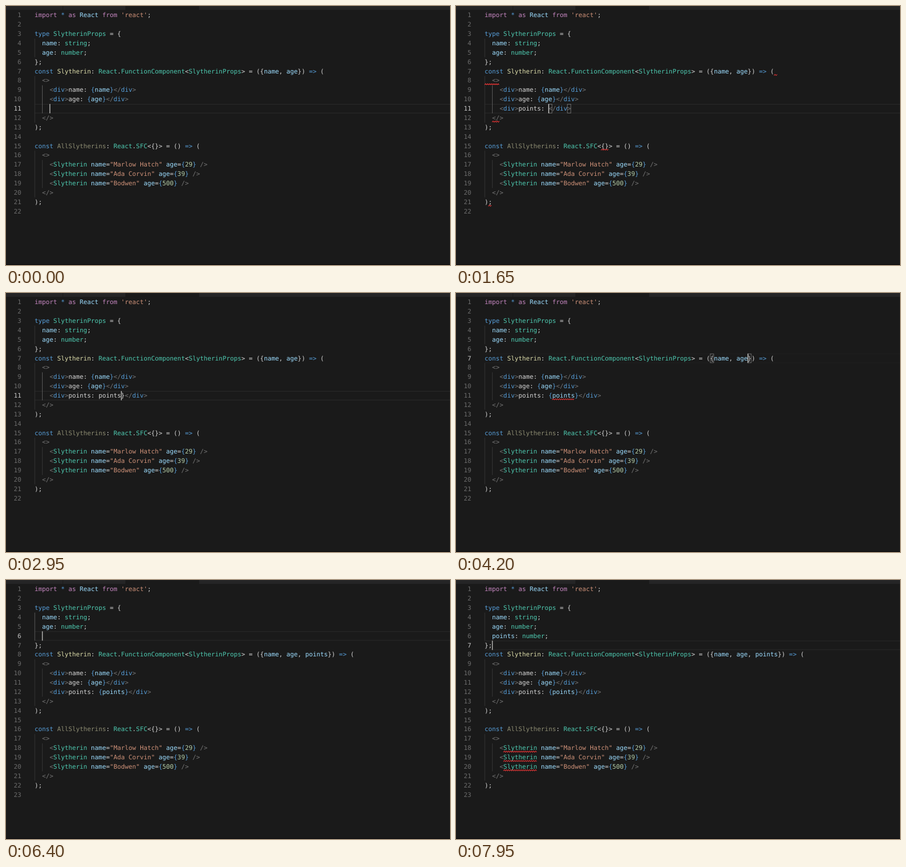
Animation of 800 by 468 pixels, one loop 8 s. Source, as an HTML page:

```html
<!DOCTYPE html>
<html lang="en">
<head>
<meta charset="utf-8">
<title>Code editor</title>
<style>
  html, body { margin: 0; width: 100%; height: 100%; overflow: hidden; background: #1a1a1a; }
  svg { display: block; width: 800px; height: 468px; }
  text { font: 11.25px "DejaVu Sans Mono", "Liberation Mono", monospace; text-rendering: geometricPrecision; white-space: pre; }
  .num { text-anchor: end; fill: #6c6c6c; }
  .num.on { fill: #c6c6c6; }
  .wave { fill: none; stroke: #dc3434; stroke-width: 1.1; }
  .match { fill: none; stroke: #808080; stroke-width: .8; }
</style>
</head>
<body>
<svg id="stage" viewBox="0 0 800 468"></svg>
<script>
const LOOP = 8000, LEFT = 51.5, TOP = 8.3, CHAR = 6.773, ROW = 16.875;
const COLORS = {
  w: '#d4d4d4', b: '#569cd6', p: '#c586c0', c: '#9cdcfe', t: '#4ec9b0',
  y: '#dcdcaa', d: '#8d8c72', s: '#ce9178', n: '#b5cea8', g: '#757575'
};
const stage = document.getElementById('stage');

const colX = col => LEFT + col * CHAR;
const rowY = line => TOP + (line - 1) * ROW;
const baseY = line => Math.round(rowY(line) + 12);
const escapeText = s => s.replace(/&/g, '&amp;').replace(/</g, '&lt;').replace(/>/g, '&gt;');
const within = (t, from, to) => t >= from && t < to;

// Number of keys pressed by time t
const keys = (t, start, gap, max) =>
  Math.max(0, Math.min(max, Math.floor((t - start) / gap) + 1));

// Keep the first n visible characters of "~<colour><text>" markup
function cut(markup, n) {
  return markup.split('~').slice(1).map(part => {
    const text = part.slice(1, 1 + Math.max(0, n));
    n -= part.length - 1;
    return text && '~' + part[0] + text;
  }).join('');
}

const rect = (x, y, w, h, fill) =>
  `<rect x="${x}" y="${y}" width="${w}" height="${h}" fill="${fill}"/>`;
const label = (x, y, fill, s, extra = '') =>
  `<text x="${x.toFixed(2)}" y="${y}" fill="${fill}" ${extra}>${escapeText(s)}</text>`;

function codeLine(markup, line) {
  let col = 0, out = '';
  for (const part of markup.split('~').slice(1)) {
    const text = part.slice(1), body = text.trim();
    if (body) out += label(colX(col + text.indexOf(body)), baseY(line), COLORS[part[0]], body);
    col += text.length;
  }
  return out;
}

function wave([line, col, len]) {
  const step = 1.875, y = rowY(line) + 15, x = colX(col);
  let d = `M${x} ${y + 1}`;
  for (let i = 1; i * step <= len * CHAR; i++) d += `L${x + i * step} ${y + (i % 2 ? -1 : 1)}`;
  return `<path class="wave" d="${d}"/>`;
}

const matchBox = (line, col) =>
  `<rect class="match" x="${colX(col) + .2}" y="${rowY(line) + .5}" width="${CHAR - .6}" height="${ROW - 1}"/>`;

const guide = (col, from, to, on) =>
  rect(colX(col), rowY(from), .8, (to - from + 1) * ROW, on ? '#6a6a6a' : '#3b3b3b');

const person = (name, age) =>
  `~g    <~tSlytherin ~cname~w=~s"${name}" ~cage~w=~b{~n${age}~b} ~g/>`;
const field = name => `~g    <~bdiv~g>~w${name}: ~b{~c${name}~b}~g</~bdiv~g>`;

function readState(t) {
  const s = {
    open: keys(t, 50, 110, 5),
    closed: t >= 700,
    text: keys(t, 900, 100, 8),
    value: keys(t, 2240, 70, 6),
    brace: within(t, 2150, 2800) || t >= 3450,
    param: keys(t, 4450, 220, 4) + keys(t, 5400, 80, 4),
    shift: t >= 6200 ? 1 : 0,
    prop: keys(t, 6600, 85, 9) + keys(t, 7450, 55, 6)
  };
  if (t < 700) s.cursor = [11, 4 + s.open];
  else if (t < 2150) s.cursor = [11, 9 + s.text];
  else if (t < 2800) s.cursor = [11, 18 + s.value];
  else if (t < 3250) s.cursor = [11, 23];
  else if (t < 3800) s.cursor = [11, s.brace ? 18 : 17];
  else if (t < 5900) s.cursor = [7, 70 + s.param];
  else if (t < 6200) s.cursor = [5, 14];
  else if (t < 7900) s.cursor = [6, 2 + s.prop];
  else s.cursor = [7, 2];
  return s;
}

function pointsLine(t, s) {
  let out = '~w    ' + cut('~g<~bdiv~g>', s.open) + cut('~wpoints: ', s.text);
  const name = 'points'.slice(0, s.value);
  if (s.brace) out += `~b{~c${name}~b}`;
  else if (t >= 2800) out += `~w${name}}`;
  return out + (s.closed ? '~g</~bdiv~g>' : '');
}

function source(t, s) {
  const unclosed = within(t, 490, 700);
  const lines = [
    "~pimport ~b* ~pas ~cReact ~pfrom ~s'react'~w;",
    '',
    '~btype ~tSlytherinProps~w = {',
    '~c  name~w: ~tstring~w;',
    '~c  age~w: ~tnumber~w;',
    '~w};',
    '~bconst ~ySlytherin~w: ~tReact~w.~tFunctionComponent~w<~tSlytherinProps~w> = ({~cname~w, ~cage' +
      cut('~w, ~cpoints', s.param) + '~w}) ~b=>~w (',
    '~g  <>',
    field('name'),
    field('age'),
    pointsLine(t, s),
    '~g  </>',
    '~w);',
    '',
    unclosed ? '~wconst AllSlytherins: React.SFC<~b{}~w> = () => ('
      : '~bconst ~dAllSlytherins~w: ~tReact~w.~tSFC~w<{}> = () ~b=>~w (',
    '~g  <>',
    person('Marlow Hatch', 29),
    person('Ada Corvin', 39),
    person('Bodwen', 500),
    '~g  </>',
    '~w);',
    ''
  ];
  if (s.shift) lines.splice(5, 0, '~w  ' + cut('~cpoints~w: ~tnumber~w;', s.prop));
  return lines;
}

function errors(t, s) {
  const list = [];
  if (within(t, 490, 1750)) list.push([7, 77, 1], [8, 0, 4], [12, 2, 2], [15, 31, 2], [21, 1, 1]);
  if (within(t, 3650, 5750)) list.push([11, 18, 6]);
  if (within(t, 4750, 5750)) list.push([7, 61, 4], [7, 67, 3], [10, 15, 3]);
  if (t >= 6900) for (let i = 17; i < 20; i++) list.push([i + s.shift, 5, 9]);
  return list;
}

function matches(t, s) {
  const [line, col] = s.cursor;
  if (within(t, 490, 700)) return [[11, 4], [11, 8]];
  if (within(t, 700, 2150)) return [[11, col], [11, col + 5]];
  if (within(t, 2150, 2800)) return [[11, 17], [11, col]];
  if (within(t, 3450, 3800)) return [[11, 17], [11, 24]];
  if (within(t, 3800, 5900)) return [[line, 60], [line, col]];
  return [];
}

function bulb() {
  return rect(57.5, 92.5, 9.5, 14, '#1a1a1a') +
    '<path d="M59.6 101.5C55.6 98 57.5 93 62 93s6.400 5 2.400 8.500V105q-2.400 2-4.800 0z" fill="#fc0"/>' +
    '<path d="M60 97.200h1.300M62.800 97.200h1.300M60.500 99.500h3M60 102.700h4" stroke="#3a3210" stroke-width="1"/>';
}

function popup() {
  const x = 554.5, y = 126.3;
  let out = rect(x, y, 260, ROW * 3 + .8, '#222223') + rect(x, y, 260, ROW, '#062f4a');
  ['private method', 'prop', 'public method'].forEach((word, i) => {
    const top = y + i * ROW, base = Math.round(top + 12.8);
    out += `<path d="M562 ${top + 12.5}V${top + 3.2}h10v9.300" fill="none" stroke="#c5c5c5" stroke-width="1.200"/>`;
    out += `<path d="M561.400 ${top + 14}h11.500" stroke="#c5c5c5" stroke-width="1.200" stroke-dasharray="1.500 1"/>`;
    out += label(577.5, base, '#0f9bfb', word[0], 'font-weight="bold" style="font-weight:bold"');
    out += label(577.5 + CHAR, base, '#d4d4d4', word.slice(1));
  });
  out += label(686, Math.round(y + 12.8), '#8299a7', 'Private Method Definition');
  return out + `<rect x="${x}" y="${y}" width="260" height="${ROW * 3 + .8}" fill="none" stroke="#414141" stroke-width=".7"/>`;
}

function draw(t) {
  const s = readState(t), [line, col] = s.cursor, k = s.shift;
  const lines = source(t, s);
  const edge = line === 7 && !k ? '#1f1f1f' : '#292929';

  let out = rect(0, 0, 800, 468, '#1a1a1a') + rect(0, 0, 800, 7, '#252526') +
    rect(215, 0, 133, 7, '#1a1a1a') + rect(102, 0, 1, 7, '#1c1c1c') +
    rect(0, 466.6, 800, 1.4, '#0e0c0d');

  out += rect(LEFT, rowY(line), 748.5, 1.1, edge) + rect(LEFT, rowY(line) + ROW - 1.1, 748.5, 1.1, edge);

  out += guide(0, 4, 5 + k, line === 5 || (k && line === 6)) +
    guide(0, 8 + k, 12 + k) + guide(2, 9 + k, 11 + k, !k && line === 11) +
    guide(0, 16 + k, 20 + k) + guide(2, 17 + k, 19 + k);

  lines.forEach((markup, i) => {
    const n = i + 1;
    out += `<text class="num${n === line ? ' on' : ''}" x="27.500" y="${baseY(n)}">${n}</text>`;
    out += codeLine(markup, n);
  });

  out += matches(t, s).map(m => matchBox(...m)).join('') + errors(t, s).map(wave).join('');

  // Hint dots below the property without a full type
  if (within(t, 6900, 7750))
    for (let i = 0; i < 3; i++) out += rect(66 + i * 3.4, 106, 1.4, 1.4, '#a0a0a0');

  out += rect(colX(col) - .2, rowY(line), 1.4, ROW, '#c0c0be');
  if (within(t, 4750, 5750)) out += bulb();
  if (within(t, 4890, 5480)) out += popup();
  return out;
}

let shown = '';
function frame() {
  const next = draw(performance.now() % LOOP);
  if (next !== shown) stage.innerHTML = shown = next;
  requestAnimationFrame(frame);
}
frame();
</script>
</body>
</html>
```
